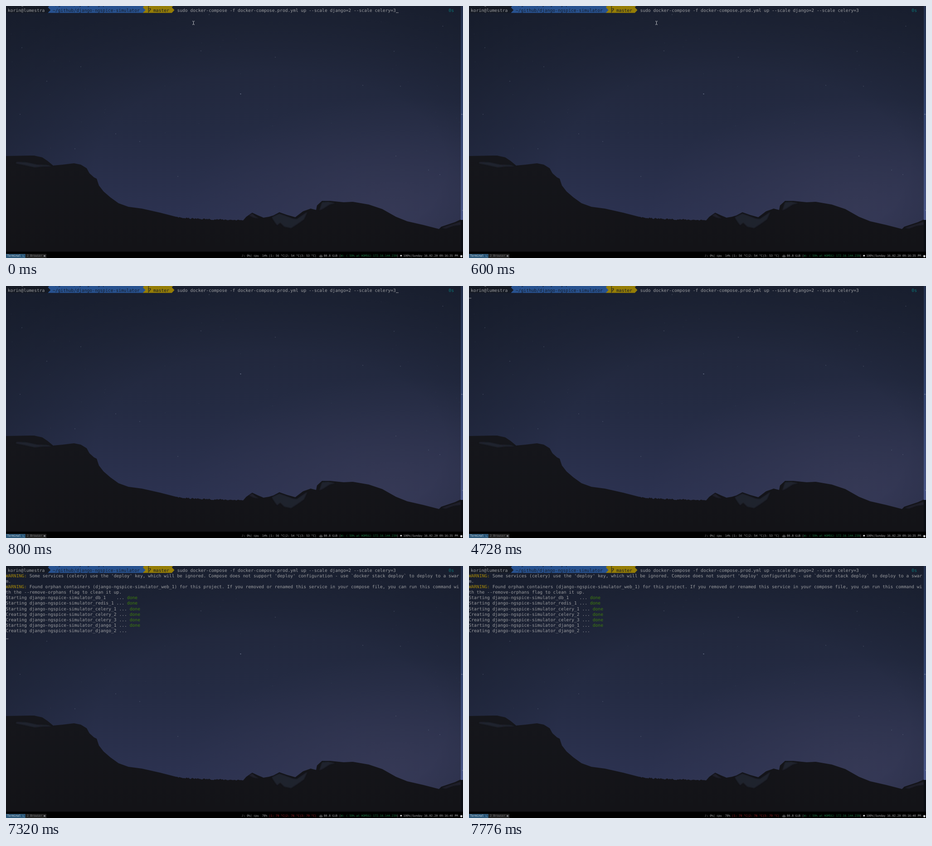
Animation, 1008 px wide and 556 px high, one loop 8 s. Source, as an HTML page:

```html
<!DOCTYPE html>
<html lang="en">
<head>
<meta charset="utf-8">
<title>Terminal session</title>
<style>
  html, body { margin: 0; width: 100%; height: 100%; overflow: hidden; background: #000; }
  svg { display: block; width: 1008px; height: 556px; }
  text {
    font-family: "DejaVu Sans Mono", monospace;
    font-size: 9.66px;
    fill: #9b9c9f;
    white-space: pre;
    text-rendering: geometricPrecision;
  }
  #bar text { font-size: 6.23px; fill: #a9abad; }
  .warn { fill: #a88a08; }
  .done { fill: #3f7d0c; }
  .dark { fill: #141a26 !important; }
  .teal { fill: #0c7376; }
  #bar .wifi { fill: #1d7a45; }
  #bar .hot { fill: #a32229; }
  #bar .tab { fill: #d5dde4; }
  #bar .idle { fill: #76787b; }

  #cursor, #pointer, .before, .after { animation: 8s step-end infinite; }
  #cursor { animation-name: cursor; }
  #pointer { animation-name: pointer; }
  .before { animation-name: before; }
  .after { animation-name: after; }
  @keyframes cursor {
    0%    { transform: translate(860.02px, 0); visibility: visible; }
    7.5%  { transform: translate(860.02px, 0); visibility: hidden; }
    10%   { transform: translate(860.02px, 0); visibility: visible; }
    10.5% { transform: translate(-.6px, 12.16px); visibility: visible; }
    91.5% { transform: translate(-.6px, 145.92px); visibility: visible; }
    93%, 100% { transform: translate(-.6px, 145.92px); visibility: hidden; }
  }
  @keyframes pointer { 0% { visibility: visible; } 10%, 100% { visibility: hidden; } }
  @keyframes before { 0% { visibility: visible; } 91.5%, 100% { visibility: hidden; } }
  @keyframes after { 0% { visibility: hidden; } 91.5%, 100% { visibility: visible; } }
</style>
</head>
<body>
<svg viewBox="0 0 1008 556">
  <defs>
    <linearGradient id="sky" x2="0" y2="1">
      <stop offset="0" stop-color="#1e2436"/>
      <stop offset=".5" stop-color="#242b43"/>
      <stop offset=".85" stop-color="#2c3250"/>
      <stop offset="1" stop-color="#323550"/>
    </linearGradient>
    <radialGradient id="glow" cx=".85" cy=".82" r=".45">
      <stop offset="0" stop-color="#3a3c58" stop-opacity=".65"/>
      <stop offset="1" stop-color="#3a3c58" stop-opacity="0"/>
    </radialGradient>
    <radialGradient id="shade" cx=".58" cy=".65" r=".85">
      <stop offset=".45" stop-color="#141a28" stop-opacity="0"/>
      <stop offset="1" stop-color="#141a28" stop-opacity=".75"/>
    </radialGradient>
    <linearGradient id="rock" x2="0" y2="1">
      <stop offset="0" stop-color="#15161b"/>
      <stop offset="1" stop-color="#131317"/>
    </linearGradient>
    <linearGradient id="edge" x2="0" y2="1">
      <stop offset="0" stop-color="#22304c"/>
      <stop offset=".5" stop-color="#334570"/>
      <stop offset="1" stop-color="#4a5788"/>
    </linearGradient>
    <filter id="soft"><feGaussianBlur stdDeviation="1.2"/></filter>
  </defs>

  <g id="scene">
    <rect width="1008" height="542" fill="url(#sky)"/>
    <rect width="1008" height="542" fill="url(#glow)"/>
    <rect width="1008" height="542" fill="url(#shade)"/>
    <rect x="1003" width="5" height="480" fill="url(#edge)"/>
    <g id="stars"></g>
    <path id="land" fill="url(#rock)"/>
    <g fill="#2b2d3d" filter="url(#soft)">
      <path d="M24 344l22 1 22 5 24 1 9 3-20 0-18 2-22-5-20-4z" opacity=".6"/>
      <path d="M586 466l17-8 14 5 16 6 8 1 12-8 12-8-8 17-14 10-14 9-15-3-9-9-7 6-7-10z" opacity=".6"/>
      <path d="M697 433l14-1 15 3-12 3-14 9-9 4z" opacity=".6"/>
      <path d="M536 462l7-4 6 5 9 6-12-2z" opacity=".5"/>
      <path d="M960 490l14-5 16-5 13-4 0 7-16 2-16 6z" opacity=".5"/>
    </g>
    <path d="M1003 472h5v70h-5z" fill="#0b0e15"/>
  </g>

  <g id="term"></g>
  <rect id="cursor" y="14.3" width="5.8" height=".9" fill="#a6a7aa"/>
  <path id="pointer" d="M411 33.4q2 0 2.5 1q.5-1 2.5-1M413.5 34.4v6M411 41.2q2 0 2.5-1q.5 1 2.5 1" fill="none" stroke="#c3c5ca" stroke-width="1"/>

  <g id="bar">
    <rect y="542" width="1008" height="14" fill="#000"/>
    <rect x=".3" y="547.3" width="42" height="8.4" fill="#285577" stroke="#4c7899" stroke-width=".6"/>
    <rect x="43.8" y="547.3" width="45" height="8.4" fill="#222" stroke="#333" stroke-width=".6"/>
    <path d="M36.5 549.8l2 1.7-2 1.7M38.8 553.4h1.8" fill="none" stroke="#9db5c8" stroke-width=".7"/>
    <circle cx="85" cy="551.5" r="2" fill="#85878a"/>
    <path d="M692 551.5a2.8 2.5 0 0 1 5.4 0v2h-5.4z" fill="none" stroke="#a9abad" stroke-width=".8"/>
    <path d="M693.5 551.8h2.4" stroke="#a9abad" stroke-width=".8"/>
    <circle cx="871.3" cy="550.8" r="1.9" fill="#d5d6d8"/>
    <circle cx="1004.3" cy="552" r="2.4" fill="#d9dadc"/>
  </g>
</svg>
<script>
  const NS = "http://www.w3.org/2000/svg";
  const $ = id => document.getElementById(id);
  const CELL = 5.815, ROW = 12.16, LEFT = -0.6, BASE = 12.5;
  const colX = col => LEFT + col * CELL;

  function add(parent, tag, attrs, content) {
    const el = document.createElementNS(NS, tag);
    for (const key in attrs) el.setAttribute(key, attrs[key]);
    if (content) el.textContent = content;
    parent.appendChild(el);
    return el;
  }

  function print(parent, row, col, content, cls = "") {
    add(parent, "text", { x: colX(col), y: BASE + row * ROW, class: cls }, content);
  }

  // Powerline segment: flat left side, arrow head one cell wide
  function segment(parent, row, from, to, fill) {
    const top = 3 + row * ROW, a = colX(from), b = colX(to);
    add(parent, "path", {
      d: `M${a} ${top}H${b}l${CELL} ${ROW / 2}l${-CELL} ${ROW / 2}H${a}z`, fill
    });
  }

  function prompt(row) {
    const g = $("term");
    segment(g, row, 52, 63, "#957d06");
    segment(g, row, 16, 52, "#28528f");
    segment(g, row, 0, 16, "#151a24");
    print(g, row, 0.8, "korin@lumestra");
    print(g, row, 17.8, "~/github/django-ngspice-simulator", "dark");
    const x = colX(54) + .9, y = BASE + row * ROW;
    add(g, "path", {
      d: `M${x} ${y - 9.5}v11.5M${x + 1.6} ${y - 6.2}q3.4-1.6 3 1q-.3 1.4-2.4 2.6v2.4`,
      fill: "none", stroke: "#141a26", "stroke-width": 1.1
    });
    print(g, row, 56, "master", "dark");
    print(g, row, 168, "0s", "teal");
  }

  function drawScene() {
    let seed = 11;
    const rand = () => (seed = seed * 16807 % 2147483647) / 2147483647;
    const star = (x, y, r, opacity) =>
      add($("stars"), "circle", { cx: x, cy: y, r, fill: "#8088a0", opacity });
    for (let i = 0; i < 45; i++) star(rand() * 1000, rand() * 320, .5, .25);
    const bright = [[517.5, 194], [963.5, 44.5], [35, 92], [90, 166], [165, 134], [31, 239],
      [242, 282], [295, 299], [379, 376], [152, 315], [957, 372], [932, 362], [787, 175],
      [870, 177], [856, 100], [594, 113], [430, 99], [448, 19], [860, 331]];
    bright.forEach(([x, y], i) => star(x, y, i ? .8 : 1.1, i ? .5 : .8));
    star(1005.5, 239, 1, 1);
    star(1007, 451, .9, .9);

    const ridge = "0 331 50 330 62 330 80 334 92 342 104 352 125 350 150 347 165 350 178 358 " +
      "184 369 194 378 200 381 205 396 215 409 230 422 248 435 270 443 300 447 340 456 375 465";
    const peaks = "523 473 530 465 543 456 556 462 568 467 580 465 590 462 603 455 620 461 638 466 " +
      "655 453 672 447 684 450 686 440 697 430 715 430 745 433 765 432 800 438 830 448 860 465 " +
      "885 475 920 483 955 492 960 487 990 477 1003 471";
    let trees = "";
    for (let x = 378; x < 520; x += 2.5)
      trees += ` ${x} ${467 + 7 * Math.sqrt((x - 378) / 142) - rand() * 3}`;
    $("land").setAttribute("d", `M${ridge}${trees} ${peaks}V542H0z`);
  }

  function drawTerminal() {
    prompt(-1);
    prompt(0);
    const g = $("term");
    print(g, 0, 65, "sudo docker-compose -f docker-compose.prod.yml up --scale django=2 --scale celery=3");

    const out = add(g, "g", { class: "after" });
    const warning = (row, first, rest) => {
      print(out, row, 0, "WARNING:", "warn");
      print(out, row, 9, first);
      print(out, row + 1, 0, rest);
    };
    warning(1, "Some services (celery) use the 'deploy' key, which will be ignored. Compose does not " +
      "support 'deploy' configuration - use `docker stack deploy` to deploy to a swar", "m.");
    warning(3, "Found orphan containers (django-ngspice-simulator_web_1) for this project. If you removed " +
      "or renamed this service in your compose file, you can run this command wi",
      "th the --remove-orphans flag to clean it up.");

    const services = ["Starting db_1   ", "Starting redis_1", "Starting celery_1", "Creating celery_2",
      "Creating celery_3", "Starting django_1", "Creating django_2"];
    services.forEach((entry, i) => {
      const line = entry.replace(" ", " django-ngspice-simulator_") + " ... ";
      print(out, 5 + i, 0, line);
      if (i < 6) print(out, 5 + i, line.length, "done", "done");
    });
  }

  function drawBar() {
    const bar = $("bar");
    const label = (x, content, cls = "") => add(bar, "text", { x, y: 553, class: cls }, content);
    label(2.5, "Terminal", "tab");
    label(46, "2 Browser", "idle");
    label(520, "♪: 0%|");
    label(546.3, "cpu");
    const stats = (cls, load, temps, tone, time) => {
      label(565, load, cls);
      label(580, temps.map((t, i) => `|${i + 1}: ${t} °C`).join("") + "|", `${cls} ${tone}`);
      label(896, `Sunday 16.02.20 ${time} PM`, cls);
    };
    stats("before", "14%", [56, 54, 53], "", "09:16:35");
    stats("after", "78%", [79, 76, 79], "hot", "09:16:40");
    label(701, "80.8 GiB");
    label(735, "|");
    label(738.7, "W: ( 59% at HOM5G) 172.16.144.239", "wifi");
    label(862, "|");
    label(876.5, "100%|");
  }

  drawScene();
  drawTerminal();
  drawBar();
</script>
</body>
</html>
```
